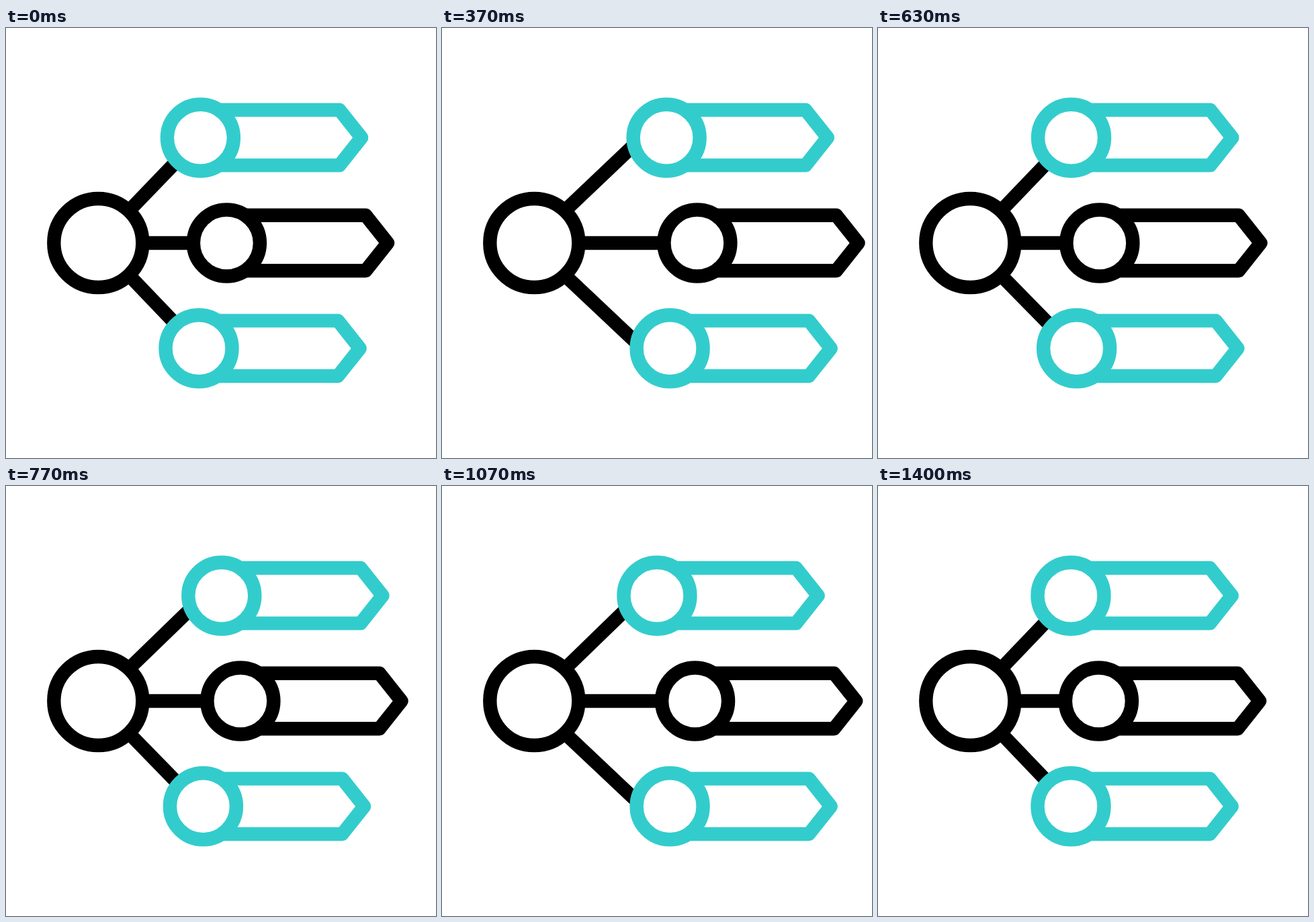
An HTML page with a canvas for the animation above (1670 ms loop, 640 by 640 pixels).

```html
<!DOCTYPE html>
<html lang="en">
<head>
<meta charset="utf-8">
<style>
html, body { margin: 0; width: 100%; height: 100%; overflow: hidden; background: #fff; }
canvas { display: block; }
</style>
</head>
<body>
<canvas width="640" height="640"></canvas>
<script>
const ctx = document.querySelector('canvas').getContext('2d');
const LOOP = 1670, STEP = 33.4, SEGMENT = 10, STAGGER = 1.45, REACH = 52.3;
const BLACK = '#000', TEAL = '#33cccc';

// Horizontal bezier handles for: out, back, out, back
const EASES = [[0.4, 0.6], [0.47, 0.65], [0.26, 0.36], [0.51, 0.19]];

const BRANCHES = [
  { x: 287, y: 163.2, color: TEAL, lead: STAGGER, side: -1 },
  { x: 328.4, y: 320, color: BLACK, lead: 0, side: 0 },
  { x: 287, y: 476.8, color: TEAL, lead: -STAGGER, side: 1 },
];

// Cubic bezier easing (a, 0, b, 1), solved by bisection
function ease(x, [a, b]) {
  let lo = 0, hi = 1, t = 0.5;
  for (let i = 0; i < 24; i++) {
    t = (lo + hi) / 2;
    const u = 1 - t;
    if (3 * a * t * u * u + 3 * b * t * t * u + t * t * t < x) lo = t;
    else hi = t;
  }
  return t * t * (3 - 2 * t);
}

// How far out a branch is, 0 to 1
function extension(time) {
  const pos = time / SEGMENT, segment = Math.floor(pos);
  if (pos <= 0 || segment >= EASES.length) return 0;
  const e = ease(pos - segment, EASES[segment]);
  return segment % 2 ? 1 - e : e;
}

function stroke(color, ...points) {
  ctx.strokeStyle = color;
  ctx.beginPath();
  points.forEach(([x, y]) => ctx.lineTo(x, y));
  ctx.stroke();
}

function ring(x, y, r, color) {
  ctx.strokeStyle = color;
  ctx.beginPath();
  ctx.arc(x, y, r, 0, 2 * Math.PI);
  ctx.fill();
  ctx.stroke();
}

function drawBranch({ x, y, color, lead, side }, step) {
  const out = extension(step + lead);
  const cx = x + REACH * out;
  if (side) stroke(BLACK, [186, 320 + side * 51], [252 + 39 * out, 320 + side * (120 + 30 * out)]);
  else stroke(BLACK, [203, 320], [cx - 49, 320]);
  ring(cx, y, 49.5, color);
  stroke(color, [cx + 27.5, y - 41.2], [cx + 207, y - 41.2], [cx + 239.7, y],
    [cx + 207, y + 41.2], [cx + 27.5, y + 41.2]);
}

function draw(now) {
  const step = Math.floor((now % LOOP + 5) / STEP) % 50;
  ctx.fillStyle = '#fff';
  ctx.fillRect(0, 0, 640, 640);
  ctx.lineWidth = 20.4;
  ctx.lineJoin = 'round';
  BRANCHES.forEach(branch => drawBranch(branch, step));
  ring(137.3, 320, 66, BLACK);
  requestAnimationFrame(() => draw(performance.now() - start));
}

const start = performance.now();
draw(0);
</script>
</body>
</html>
```
